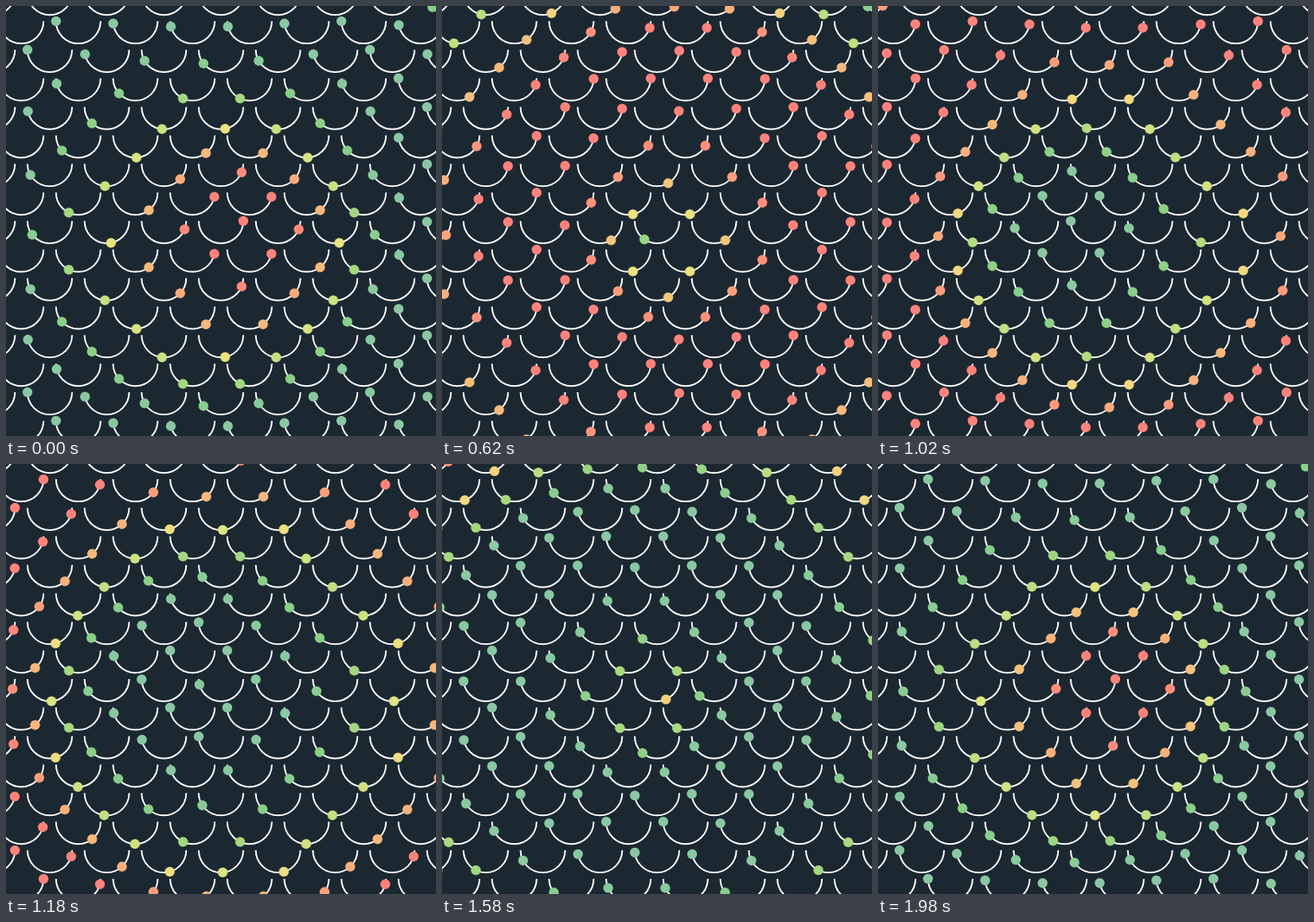
An HTML page with a canvas for the animation above (2 s loop, 540x540 px).

```html
<!DOCTYPE html>
<html lang="en">
<head>
<meta charset="utf-8">
<title>Rolling dots</title>
<style>
  html, body { margin: 0; width: 100%; height: 100%; overflow: hidden; background: #1c2831; }
  canvas { display: block; width: 540px; height: 540px; }
</style>
</head>
<body>
<canvas id="stage" width="540" height="540"></canvas>
<script>
const SIZE = 540, MID = SIZE / 2;
const LOOP = 2000, STEP = 20, FRAMES = LOOP / STEP;
const GAP = 71.68, ARC = 28, DOT = 6.2;
const LAG = 0.586 / 360;             // turns of delay per pixel from the centre
const SAMPLES = 4, SHUTTER = 0.6;    // motion blur

// colour along the arc: right end = 0, left end = 1
const RAMP = [
  [0, 255, 130, 124], [0.1, 255, 130, 124], [0.22, 253, 166, 123],
  [0.3, 246, 187, 125], [0.4, 243, 220, 128], [0.45, 233, 230, 128],
  [0.55, 192, 224, 131], [0.65, 162, 216, 128], [0.76, 136, 208, 136],
  [0.85, 137, 202, 160], [1, 137, 200, 163]
];

function rampColor(p) {
  let i = 1;
  while (i < RAMP.length - 1 && RAMP[i][0] < p) i++;
  const a = RAMP[i - 1], b = RAMP[i];
  const k = (p - a[0]) / (b[0] - a[0]);
  const mix = n => Math.round(a[n] + (b[n] - a[n]) * k);
  return `rgb(${mix(1)},${mix(2)},${mix(3)})`;
}

const cells = [];
for (let row = -9; row <= 9; row++) {
  const shift = row % 2 ? 0.5 : 0;
  for (let col = -5; col <= 5; col++) {
    const dx = (col + shift) * GAP, dy = row * GAP / 2;
    cells.push({ x: MID + dx, y: MID + dy, lag: Math.hypot(dx, dy) * LAG });
  }
}

function makeLayer() {
  const layer = document.createElement('canvas');
  layer.width = layer.height = SIZE;
  return layer;
}

const arcs = makeLayer();
const arcCtx = arcs.getContext('2d');
arcCtx.fillStyle = '#1c2831';
arcCtx.fillRect(0, 0, SIZE, SIZE);
arcCtx.strokeStyle = '#fff';
arcCtx.lineWidth = 2;
for (const { x, y } of cells) {
  arcCtx.beginPath();
  arcCtx.arc(x, y, ARC, 0, Math.PI);
  arcCtx.stroke();
}

const scene = makeLayer();
const sceneCtx = scene.getContext('2d');
const ctx = document.getElementById('stage').getContext('2d');

function drawScene(t) {
  sceneCtx.drawImage(arcs, 0, 0);
  for (const { x, y, lag } of cells) {
    const p = (1 - Math.cos(2 * Math.PI * (t - lag))) / 2;
    const angle = p * Math.PI;
    sceneCtx.fillStyle = rampColor(p);
    sceneCtx.beginPath();
    sceneCtx.arc(x + ARC * Math.cos(angle), y + ARC * Math.sin(angle), DOT, 0, 2 * Math.PI);
    sceneCtx.fill();
  }
}

function render(now) {
  const frame = Math.floor((now % LOOP) / STEP);
  for (let k = 0; k < SAMPLES; k++) {
    drawScene((frame + k * SHUTTER / SAMPLES) / FRAMES);
    ctx.globalAlpha = 1 / (k + 1);   // running average
    ctx.drawImage(scene, 0, 0);
  }
}

function tick(now) {
  render(now);
  requestAnimationFrame(tick);
}
render(0);
requestAnimationFrame(tick);
</script>
</body>
</html>
```
